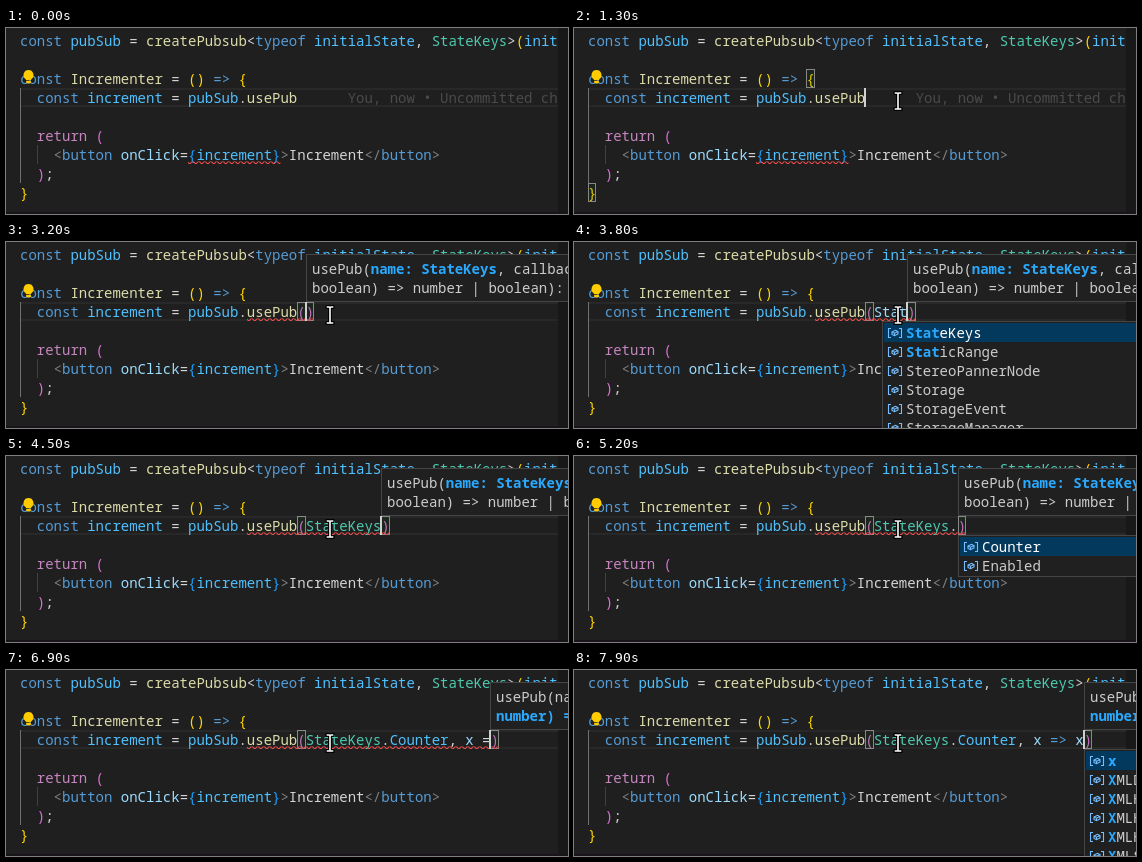
Recreate the animation shown at these times as an HTML page. Size 562 by 186 pixels, loop 8000 ms.

```html
<!DOCTYPE html>
<html lang="en">
<head>
<meta charset="utf-8">
<title>Editor</title>
<style>
html, body { margin: 0; width: 100%; height: 100%; overflow: hidden; background: #1f1f1f; }
#stage { position: relative; width: 562px; height: 186px; overflow: hidden; background: #1f1f1f;
  font: 14px/19px "Noto Sans Mono", "DejaVu Sans Mono", monospace; color: #d4d4d4; }
#stage div, #stage svg { position: absolute; box-sizing: border-box; }
#code { left: 0; top: 0; width: 552px; height: 186px; overflow: hidden; }
.row, .line { white-space: pre; height: 19px; }
#current { left: 14px; top: 60px; width: 540px; height: 19px; border: solid #282828; border-width: 2px 0; }
.guide { width: 1px; background: #404040; }
.match { width: 8.4px; height: 19px; border: 1px solid #888; background: rgba(0, 100, 0, .1); }
#caret { top: 60px; width: 2px; height: 19px; background: #d0d0d0; }
#side { left: 552px; top: 0; width: 10px; height: 186px; background: #181818; }
#foot { left: 0; top: 184px; width: 562px; height: 2px; background: #18141a; }
#help, #list { border: 1px solid #454545; background: #202020; color: #ccc; overflow: hidden; }
#help { top: 12px; width: 440px; height: 48px; }
#list { top: 79px; width: 430px; }
#list .line { left: 1px; right: 1px; }
#list .line:first-child { background: #04395e; color: #fff; }
#list .line span { position: absolute; left: 22px; }
#list svg { left: 3px; top: 2px; }
b, i { color: #2aaaff; font-style: normal; font-weight: bold; }
.k { color: #569cd6 } .v { color: #4fc1ff } .f { color: #dcdcaa } .t { color: #4ec9b0 }
.p { color: #9cdcfe } .r { color: #c586c0 } .g { color: #808080 } .n { color: #4b4b4b }
.b1 { color: #ffd700 } .b2 { color: #da70d6 } .b3 { color: #179fff }
</style>
</head>
<body>
<div id="stage">
  <div id="code">
    <div id="current"></div>
    <div class="guide" style="left:14px;top:60px;height:95px;background:#707070"></div>
    <div class="guide" style="left:31px;top:117px;height:19px"></div>
    <div id="rows"></div>
    <div id="marks"></div>
    <svg width="552" height="186" style="left:0;top:0">
      <defs>
        <pattern id="wave" width="6" height="3" patternUnits="userSpaceOnUse">
          <path fill="#f14c4c" d="M5.5 0 2.5 3H1.1L4.1 0ZM4 0 6 2V.6L5.4 0ZM0 2 1 3H2.4L0 .6Z"/>
        </pattern>
      </defs>
      <g transform="translate(182 133)"><rect id="oldError" width="92.4" height="3" fill="url(#wave)"/></g>
      <g transform="translate(241 76)"><rect id="error" height="3" fill="url(#wave)"/></g>
      <g fill="#fc0">
        <path d="M22.5 42a5 5 0 0 1 3 9l-.6 1.2h-4.8L19.500 51a5 5 0 0 1 3-9Z"/>
        <path d="M20.200 53h4.600v1.500l-1 .9h-2.600l-1-.9Z"/>
      </g>
    </svg>
    <div id="caret"></div>
  </div>
  <div id="side"></div>
  <div id="foot"></div>
  <div id="help"></div>
  <div id="list"></div>
  <svg id="mouse" width="12" height="20" viewBox="-6 -10 12 20">
    <g fill="none" stroke-linecap="square">
      <path id="beam" d="M-2.500-8H-1Q0-8 0-7Q0-8 1-8H2.500M0-7V7M-2.500 8H-1Q0 8 0 7Q0 8 1 8H2.500" stroke="#000" stroke-width="3.600"/>
      <use href="#beam" style="stroke:#fff"/>
      <path d="M-2.500-8H-1Q0-8 0-7Q0-8 1-8H2.500M0-7V7M-2.500 8H-1Q0 8 0 7Q0 8 1 8H2.500" stroke="#fff" stroke-width="1.600"/>
    </g>
  </svg>
</div>
<script>
const LOOP = 8000, CW = 8.4, LEFT = 14, TOP = 3, LH = 19;
const ARG_X = LEFT + 34 * CW;
const $ = id => document.getElementById(id);
const esc = s => s.replace(/&/g, '&amp;').replace(/</g, '&lt;');
const paint = tokens => tokens.map(([c, s]) => `<span class="${c}">${esc(s)}</span>`).join('');
const row = (n, col, tokens) =>
  `<div class="row" style="left:${LEFT + col * CW}px;top:${TOP + n * LH}px">${paint(tokens)}</div>`;
const at = (steps, t) => steps.filter(s => s[0] <= t).pop();

const fixedRows = [
  row(0, 0, [['k', 'const '], ['v', 'pubSub'], ['', ' = '], ['f', 'createPubsub'], ['', '<'], ['k', 'typeof '],
    ['v', 'initialState'], ['', ', '], ['t', 'StateKeys'], ['', '>'], ['b1', '('], ['v', 'initialState']]),
  row(2, 0, [['k', 'const '], ['f', 'Incrementer'], ['', ' = '], ['b1', '()'], ['k', ' => '], ['b1', '{']]),
  row(5, 2, [['r', 'return '], ['b2', '(']]),
  row(6, 4, [['g', '<'], ['k', 'button '], ['p', 'onClick'], ['', '='], ['b3', '{'], ['v', 'increment'], ['b3', '}'],
    ['g', '>'], ['', 'Increment'], ['g', '</'], ['k', 'button'], ['g', '>']]),
  row(7, 2, [['b2', ')'], ['', ';']]),
  row(8, 0, [['b1', '}']])
].join('');

// Text between the call's brackets; null until the call is opened
const typing = [
  [0, null], [2200, ''], [3500, 'S'], [3600, 'St'], [3800, 'Stat'], [4000, 'State'],
  [4300, 'StateKeys'], [4700, 'StateKeys.'], [5700, 'StateKeys.Counter'],
  [5900, 'StateKeys.Counter,'], [6000, 'StateKeys.Counter, '], [6400, 'StateKeys.Counter, x'],
  [6700, 'StateKeys.Counter, x '], [6900, 'StateKeys.Counter, x ='], [7100, 'StateKeys.Counter, x =>'],
  [7200, 'StateKeys.Counter, x => '], [7500, 'StateKeys.Counter, x => x']
];

const xItems = ['x', 'XMLDocument', 'XMLHttpRequest', 'XMLHttpRequestEventTarget', 'XMLHttpRequestUpload', 'XMLSerializer'];
const stItems = ['StateKeys', 'StaticRange', 'StereoPannerNode', 'Storage', 'StorageEvent', 'StorageManager'];
const stateItems = ['StateKeys', 'initialState', 'PopStateEvent', 'StaticRange', 'XMLDocument', 'setState'];
// time, column of the list, matched letters, items
const lists = [
  [0], [3600, 1, 2, stItems], [3800, 1, 4, stItems], [4000, 1, 5, stateItems], [4300],
  [4800, 10, 0, ['Counter', 'Enabled']], [5700],
  [6500, 20, 1, xItems], [6700], [7600, 25, 1, xItems]
];

const icon = `<svg width="16" height="16" fill="none" stroke="#75beff" stroke-width="1.1">
  <path d="M4 3.500H1.500V12.500H4M12 3.500H14.500V12.500H12M5 7 8.500 5.300 11 6.500V9L7.500 10.700 5 9.500ZM5 7 7.500 8.200 11 6.500M7.500 8.200V10.700"/></svg>`;

function argTokens(arg) {
  const [, name, dot, member, rest] = arg.match(/^(\w*)(\.?)(\w*)(.*)$/);
  const out = [[name === 'StateKeys' ? 't' : 'p', name], ['', dot], ['v', member]];
  const kind = s => s === 'x' ? 'p' : s === '=>' ? 'k' : '';
  for (const s of rest.match(/=>|./g) || []) out.push([kind(s), s]);
  return out;
}

function drawCode(t, arg) {
  const tokens = [['k', 'const '], ['v', 'increment'], ['', ' = '], ['v', 'pubSub'], ['', '.'], ['f', 'usePub']];
  if (arg === null) tokens.push(['n', '      You, now • Uncommitted changes']);
  else tokens.push(['b2', '('], ...argTokens(arg), ['b2', ')']);
  return fixedRows + row(3, 2, tokens);
}

function drawMarks(t, arg, x) {
  const mark = (left, n) => `<div class="match" style="left:${left}px;top:${TOP + n * LH}px"></div>`;
  if (t < 1200) return '';
  return arg === null ? mark(LEFT + 26 * CW, 2) + mark(LEFT, 8) : mark(ARG_X - CW, 3) + mark(x, 3);
}

function drawHelp(t) {
  const second = t >= 6200, type = t >= 5800 ? 'number' : 'number | boolean';
  const tail = t >= 5800 ? 'number) => number' : 'boolean) => number | boolean';
  const open = 'callback: (value: ' + type.replace(/\w+$/, '');
  const a = second ? `usePub(name: StateKeys, <b>${open}</b>` : `usePub(<b>name: StateKeys</b>, ${open}`;
  const b = second ? `<b>${esc(tail)}</b>): void` : esc(tail) + '): void';
  return `<div class="line" style="left:5px;top:4px">${a}</div><div class="line" style="left:5px;top:23px">${b}</div>`;
}

const drawList = (hit, items) => items.map((s, i) => {
  const n = s.slice(0, hit).toLowerCase() === items[0].slice(0, hit).toLowerCase() ? hit : 0;
  return `<div class="line" style="top:${1 + i * LH}px">${icon}<span><i>${s.slice(0, n)}</i>${s.slice(n)}</span></div>`;
}).join('');

const path = [[300, 400, -10], [500, 335, 30], [700, 275, 68], [900, 290, 71], [1100, 324, 73]];
function pointer(t) {
  const i = path.findIndex(p => p[0] > t);
  if (i < 0) return path[path.length - 1].slice(1);
  if (i === 0) return [-50, -50];
  const [a, b] = [path[i - 1], path[i]], u = (t - a[0]) / (b[0] - a[0]);
  return [1, 2].map(k => Math.round(a[k] + (b[k] - a[k]) * u));
}

const show = (el, on) => { el.style.display = on ? '' : 'none'; };
let last = -1;

function render(now) {
  const t = Math.floor(now % LOOP / 100) * 100;
  if (t === last) return;
  last = t;
  const [since, arg] = at(typing, t), open = arg !== null;
  const x = open ? ARG_X + arg.length * CW : ARG_X - CW;
  const [, col, hit, items] = at(lists, t);
  const [mx, my] = pointer(t);

  $('rows').innerHTML = drawCode(t, arg);
  $('marks').innerHTML = drawMarks(t, arg, x);

  const lit = (t - Math.max(since, 1200)) % 1000 < 500;
  show($('caret'), t >= 1200 && lit);
  $('caret').style.left = Math.round(x - 1) + 'px';

  show($('oldError'), t < 2600);
  show($('error'), t >= 2600 && t < 7900);
  $('error').setAttribute('width', Math.max(0, x + CW - 241));

  show($('help'), t >= 2300);
  $('help').style.left = Math.round(x) + 'px';
  $('help').innerHTML = drawHelp(t);

  show($('list'), items);
  if (items) {
    $('list').style.left = Math.round(ARG_X + col * CW) + 'px';
    $('list').style.height = items.length * LH + 4 + 'px';
    $('list').innerHTML = drawList(hit, items);
  }
  $('mouse').style.left = mx - 6 + 'px';
  $('mouse').style.top = my - 10 + 'px';
}

const start = performance.now();
function tick() {
  render(performance.now() - start);
  requestAnimationFrame(tick);
}
tick();
</script>
</body>
</html>
```
